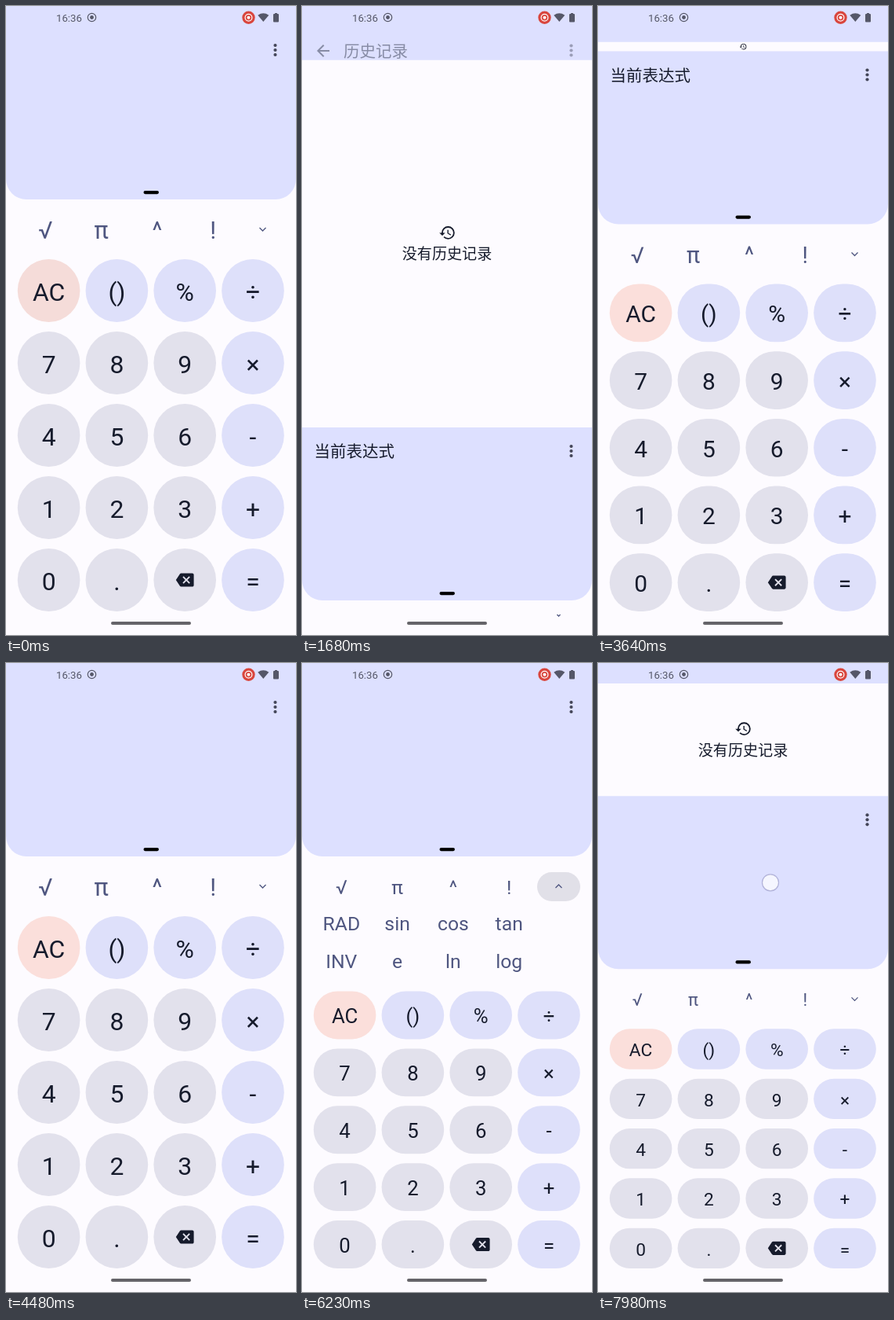
An HTML page with a canvas that plays this animation: 370x800 px, repeating every 8 s.

```html
<!DOCTYPE html>
<html lang="zh">
<head>
<meta charset="utf-8">
<title>计算器</title>
<style>
  html, body { margin: 0; width: 100%; height: 100%; overflow: hidden; background: #fdfbff; }
  canvas { display: block; }
</style>
</head>
<body>
<canvas id="stage" width="370" height="800"></canvas>
<script>
const ctx = document.getElementById('stage').getContext('2d');
const LOOP = 8000;
const BG = '#fdfbff', PANEL = '#dde0ff', INK = '#161b2c', ACCENT = '#4f5680', STATUS = '#555768';
const LATIN = 'Roboto, sans-serif', CJK = '"Noto Sans CJK SC", "Noto Sans CJK", sans-serif';

const ICONS = {
  history: new Path2D('M13 3a9 9 0 0 0-9 9H1l3.89 3.89.07.14L9 12H6c0-3.87 3.13-7 7-7s7 3.13 7 7-3.13 7-7 7c-1.93 0-3.68-.79-4.94-2.06l-1.42 1.42A8.95 8.95 0 0 0 13 21a9 9 0 0 0 0-18zm-1 5v5l4.28 2.54.72-1.21-3.5-2.08V8z'),
  erase: new Path2D('M22 3H7c-.69 0-1.23.35-1.59.88L0 12l5.41 8.11c.36.53.9.89 1.59.89h15c1.1 0 2-.9 2-2V5c0-1.1-.9-2-2-2zm-3 12.59L17.59 17 14 13.41 10.41 17 9 15.59 12.59 12 9 8.41 10.41 7 14 10.59 17.59 7 19 8.41 15.41 12 19 15.59z'),
  back: new Path2D('M20 11H7.83l5.59-5.59L12 4l-8 8 8 8 1.41-1.41L7.83 13H20z')
};
const KEYS = ['AC', '()', '%', '÷', '7', '8', '9', '×', '4', '5', '6', '-', '1', '2', '3', '+', '0', '.', 'erase', '='];
const FUNCTIONS = [['√', 'π', '^', '!'], ['RAD', 'sin', 'cos', 'tan'], ['INV', 'e', 'ln', 'log']];

const linear = u => u;
const easeOut = u => 1 - (1 - u) ** 2;
const easeInOut = u => u * u * (3 - 2 * u);

// Points are [time, value, easing into this point].
function track(t, points) {
  if (t <= points[0][0]) return points[0][1];
  for (let i = 1; i < points.length; i++) {
    const [t0, v0] = points[i - 1], [t1, v1, ease = linear] = points[i];
    if (t < t1) return v0 + (v1 - v0) * ease((t - t0) / (t1 - t0));
  }
  return points[points.length - 1][1];
}

const dragAt = t => track(t, [[580, 0], [910, 156], [1180, 330], [1560, 510, easeOut],
  [3100, 510], [3820, 0, easeOut], [7560, 0], [7980, 143], [8000, 150]]);
const toolbarAt = t => track(t, [[1560, 0], [1820, 60, easeOut], [3400, 60], [3760, 0]]);
const expandAt = t => track(t, [[5150, 0], [5490, 1, easeInOut], [6960, 1], [7300, 0, easeInOut]]);
const pressAt = t => track(t, [[5080, 0], [5160, .19], [5400, .19], [5700, .12], [6900, .12],
  [6980, .19], [7180, .19], [7420, 0]]);

function fingerAt(t, drag) {
  if (t > 500 && t < 1220) return [301, 124 + drag];
  if (t > 2280 && t < 2460) return [37, 64];
  if ((t > 5060 && t < 5160) || (t > 6880 && t < 6980)) return [327, 285];
  if (t > 7480) return [220, 136 + drag];
  return null;
}

function box(x, y, w, h, radii, color) {
  ctx.fillStyle = color;
  ctx.beginPath();
  ctx.roundRect(x, y, w, h, radii);
  ctx.fill();
}

function dot(x, y, r, color) {
  ctx.fillStyle = color;
  ctx.beginPath();
  ctx.arc(x, y, r, 0, 2 * Math.PI);
  ctx.fill();
}

function ring(x, y, r, width, color) {
  ctx.strokeStyle = color;
  ctx.lineWidth = width;
  ctx.beginPath();
  ctx.arc(x, y, r, 0, 2 * Math.PI);
  ctx.stroke();
}

function polygon(points, color) {
  ctx.fillStyle = color;
  ctx.beginPath();
  points.forEach(p => ctx.lineTo(...p));
  ctx.fill();
}

function label(text, x, y, size, color, align = 'center', family = LATIN) {
  ctx.font = `${size}px ${family}`;
  ctx.textAlign = align;
  ctx.fillStyle = color;
  ctx.fillText(text, x, y + size * .365);
}

function icon(name, x, y, scale, cx = 12) {
  ctx.save();
  ctx.translate(x, y);
  ctx.scale(scale, scale);
  ctx.translate(-cx, -12);
  ctx.fillStyle = INK;
  ctx.fill(ICONS[name]);
  ctx.restore();
}

function menuDots(y) {
  for (const dy of [-6, 0, 6]) dot(343.5, y + dy, 2.1, '#444659');
}

function drawStatusBar() {
  box(0, 0, 370, 26, 0, PANEL);
  label('16:36', 64, 15, 13.2, STATUS, 'left');
  ring(109.5, 14.5, 5.2, 1.2, STATUS);
  dot(109.5, 14.5, 2.4, STATUS);
  dot(309.5, 14.8, 8.2, '#d9463e');
  ring(309.5, 14.8, 4.4, 1.2, '#fff');
  dot(309.5, 14.8, 2, '#fff');
  ctx.fillStyle = STATUS;
  ctx.beginPath();
  ctx.moveTo(328.3, 20);
  ctx.lineTo(321.3, 11.7);
  ctx.quadraticCurveTo(328.3, 6.8, 335.3, 11.7);
  ctx.fill();
  box(341, 10, 7, 10.5, 1, STATUS);
  box(343, 9, 3, 2, 0, STATUS);
}

function drawHistory(toolbar, panelTop) {
  const top = 26 + toolbar, space = panelTop - top;
  if (space > 2) {
    const middle = top + space / 2, roomy = space > 50;
    icon('history', 185, roomy ? middle - 14 : middle, .93 * Math.min(1, space / 26), 11.5);
    if (roomy) label('没有历史记录', 185, middle + 13, 19.1, INK, 'center', CJK);
  }
  if (toolbar <= 0) return;
  box(0, 26, 370, toolbar, 0, PANEL);
  if (toolbar > 30) {
    ctx.globalAlpha = (toolbar - 30) / 30;
    icon('back', 27, 57, 1);
    label('历史记录', 53, 57.5, 20.5, INK, 'left', CJK);
    menuDots(56.5);
    ctx.globalAlpha = 1;
  }
}

function drawPanel(drag, showTitle) {
  box(0, 26 + drag, 370, 220, [0, 0, 26, 26], PANEL);
  if (showTitle) label('当前表达式', 15.5, 56.8 + drag, 20.5, INK, 'left', CJK);
  menuDots(56 + drag);
  box(175.5, 235 + drag, 19.5, 4.2, 2.1, '#000');
}

function drawFunctions(t, drag, expand, fontSize) {
  const half = Math.min(39, (550 - drag) / 2);
  const y = 246 + drag + half;
  const press = pressAt(t);
  if (press > 0) box(300, y - 19, 55, 37, 18.5, `rgba(30,30,70,${press})`);

  const up = t > 5150 && t < 6960 ? -1 : 1, size = 4 * Math.min(1, half / 39);
  ctx.strokeStyle = ACCENT;
  ctx.lineWidth = 1.3;
  ctx.beginPath();
  ctx.moveTo(327.5 - size, y - 1 - up * size / 2);
  ctx.lineTo(327.5, y - 1 + up * size / 2);
  ctx.lineTo(327.5 + size, y - 1 - up * size / 2);
  ctx.stroke();

  if (fontSize < 2) return;
  const columnX = i => 50.3 + i * 71.3;
  FUNCTIONS[0].forEach((name, i) => label(name, columnX(i), y, fontSize, ACCENT));
  if (expand < .02) return;

  for (const row of [1, 2]) {
    const baseline = 292 + drag + 48 * row * expand;
    ctx.save();
    ctx.beginPath();
    ctx.rect(0, baseline - 20 * expand, 300, 20 * expand + 8);
    ctx.clip();
    ctx.globalAlpha = expand ** 1.8;
    // The narrow first cell wraps while its text is still large.
    if (row === 1 && expand < .8) label('D', 36, baseline - fontSize * .365, fontSize, ACCENT);
    else FUNCTIONS[row].forEach((name, i) => label(name, columnX(i), baseline - fontSize * .365, fontSize, ACCENT));
    ctx.restore();
  }
}

function drawKeys(t, top, height, fontSize) {
  if (height <= 1) return;
  KEYS.forEach((key, i) => {
    const column = i % 4, row = Math.floor(i / 4);
    const x = 54.6 + column * 86.8, y = top + height / 2 + row * (height + 12);
    let color = row === 0 || column === 3 ? '#dee0fa' : '#e2e1ec';
    if (key === 'AC') color = t < 140 ? '#f5dcd9' : '#fbdfdb';
    box(x - 39.8, y - height / 2, 79.6, height, Math.min(height, 79.6) / 2, color);
    if (key === 'erase') icon('erase', x, y, .95 * Math.min(1, height / 30));
    else label(key, x, y + 1, fontSize, INK);
  });
}

function drawFinger(finger) {
  if (!finger) return;
  dot(...finger, 10.5, 'rgba(255,255,255,.7)');
  ring(...finger, 10.5, 1.2, 'rgba(125,125,180,.5)');
}

function draw(t) {
  const drag = dragAt(t), expand = expandAt(t);
  const keysTop = 322 + drag + 95.5 * expand;
  const keyHeight = (770 - keysTop - 48) / 5;
  const fontSize = 6.3 + .32 * keyHeight;

  box(0, 0, 370, 800, 0, BG);
  drawKeys(t, keysTop, keyHeight, fontSize);
  drawFunctions(t, drag, expand, fontSize * .96);
  drawHistory(toolbarAt(t), 26 + drag);
  drawPanel(drag, t > 850 && t < 3820);
  drawStatusBar();
  box(134, 783, 102, 4, 2, '#656469');
  drawFinger(fingerAt(t, drag));
}

const start = performance.now();
function frame() {
  draw((performance.now() - start) % LOOP);
  requestAnimationFrame(frame);
}
frame();
</script>
</body>
</html>
```
